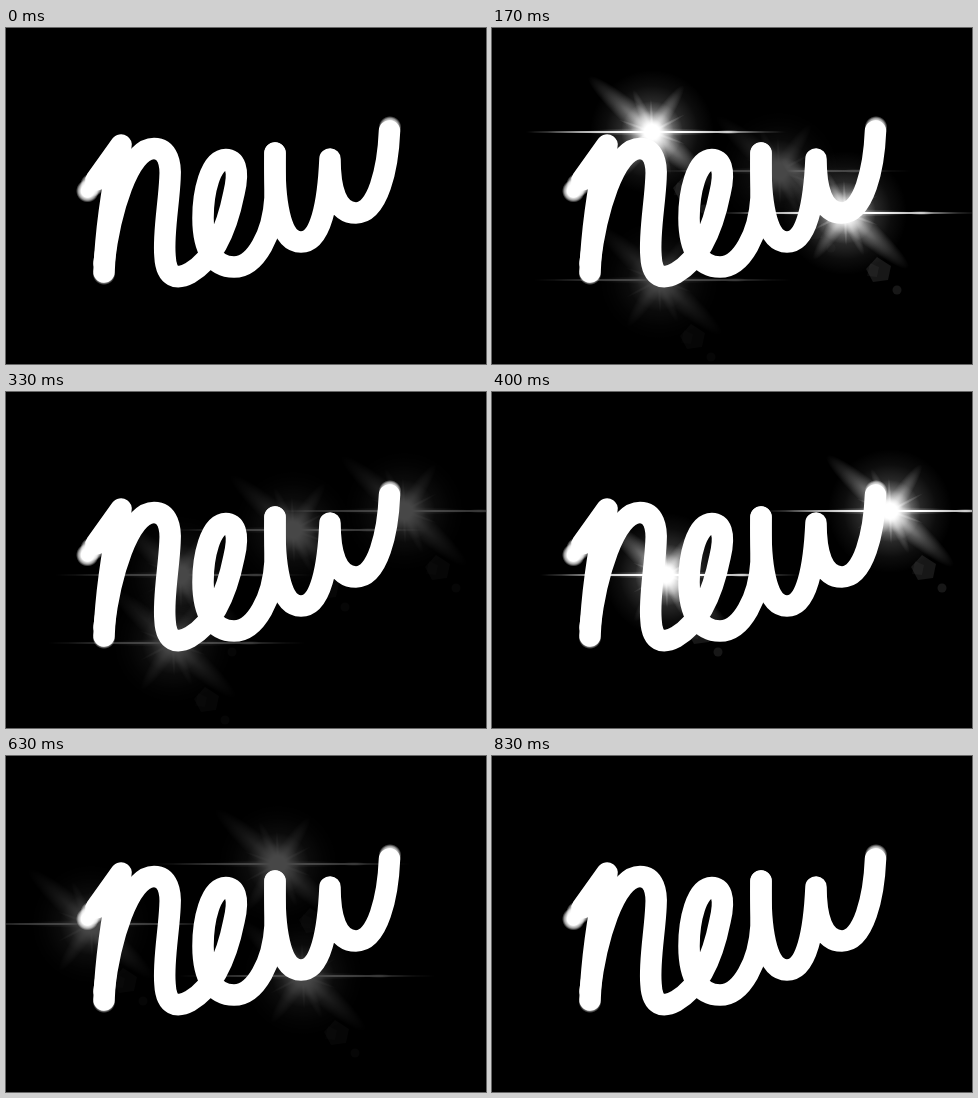
Animation, 480 px wide and 336 px high, one loop 0.91 s. Source, as an HTML page:

```html
<!DOCTYPE html>
<html lang="en">
<head>
<meta charset="utf-8">
<title>new</title>
<style>
  html, body { margin: 0; width: 100%; height: 100%; overflow: hidden; background: #000; }
  svg { display: block; width: 100vw; height: 100vh; }
  .flare {
    --from: 0px;
    --to: 0px;
    opacity: 0;
    animation: 910ms step-end infinite;
  }
  .a { animation-name: a; }
  .b { animation-name: b; }
  .c { animation-name: c; }
  .d { animation-name: d; }
  .e { animation-name: e; }

  /* each flare: dim, full, dim, off */
  @keyframes a {
    0% { opacity: 0; }
    10.989% { opacity: .28; transform: translateY(var(--from)); }
    18.681% { opacity: 1; transform: none; }
    25.275% { opacity: .28; transform: translateY(var(--to)); }
    36.264%, 100% { opacity: 0; }
  }
  @keyframes b {
    0% { opacity: 0; }
    18.681% { opacity: .28; transform: translateY(var(--from)); }
    25.275% { opacity: 1; transform: none; }
    36.264% { opacity: .28; transform: translateY(var(--to)); }
    43.956%, 100% { opacity: 0; }
  }
  @keyframes c {
    0% { opacity: 0; }
    36.264% { opacity: .28; }
    43.956% { opacity: 1; }
    51.648% { opacity: .28; }
    58.242%, 100% { opacity: 0; }
  }
  @keyframes d {
    0% { opacity: 0; }
    51.648% { opacity: .28; }
    58.242% { opacity: 1; }
    69.231% { opacity: .28; }
    76.923%, 100% { opacity: 0; }
  }
  @keyframes e {
    0% { opacity: 0; }
    69.231% { opacity: .28; }
    76.923% { opacity: 1; }
    84.615% { opacity: .28; }
    91.209%, 100% { opacity: 0; }
  }
</style>
</head>
<body>
<svg viewBox="0 0 480 336" preserveAspectRatio="none">
  <defs>
    <radialGradient id="core">
      <stop offset="0" stop-color="#fff"/>
      <stop offset=".24" stop-color="#fff"/>
      <stop offset=".42" stop-color="#fff" stop-opacity=".6"/>
      <stop offset=".7" stop-color="#fff" stop-opacity=".2"/>
      <stop offset="1" stop-color="#fff" stop-opacity="0"/>
    </radialGradient>
    <radialGradient id="halo">
      <stop offset="0" stop-color="#fff" stop-opacity=".5"/>
      <stop offset=".4" stop-color="#fff" stop-opacity=".2"/>
      <stop offset=".75" stop-color="#fff" stop-opacity=".05"/>
      <stop offset="1" stop-color="#fff" stop-opacity="0"/>
    </radialGradient>
    <radialGradient id="ray">
      <stop offset="0" stop-color="#fff" stop-opacity=".6"/>
      <stop offset=".5" stop-color="#fff" stop-opacity=".24"/>
      <stop offset="1" stop-color="#fff" stop-opacity="0"/>
    </radialGradient>
    <radialGradient id="dab">
      <stop offset=".55" stop-color="#fff"/>
      <stop offset=".8" stop-color="#fff" stop-opacity=".6"/>
      <stop offset="1" stop-color="#fff" stop-opacity="0"/>
    </radialGradient>
    <linearGradient id="streak">
      <stop offset="0" stop-color="#fff" stop-opacity="0"/>
      <stop offset=".12" stop-color="#fff" stop-opacity=".5"/>
      <stop offset=".4" stop-color="#fff"/>
      <stop offset=".6" stop-color="#fff"/>
      <stop offset=".85" stop-color="#fff" stop-opacity=".5"/>
      <stop offset="1" stop-color="#fff" stop-opacity="0"/>
    </linearGradient>

    <g id="flare" fill="url(#ray)">
      <circle r="62" fill="url(#halo)"/>
      <ellipse rx="84" ry="13" transform="rotate(41)"/>
      <ellipse rx="56" ry="9" transform="rotate(-56)"/>
      <ellipse rx="46" ry="6" transform="rotate(66)"/>
      <ellipse rx="38" ry="2" transform="rotate(-28)"/>
      <ellipse rx="36" ry="2" transform="rotate(20)"/>
      <ellipse rx="34" ry="2" transform="rotate(88)"/>
      <ellipse rx="70" ry="4"/>
      <ellipse cx="4" rx="131" ry="1.1" fill="url(#streak)"/>
      <ellipse cx="76" rx="13" ry="2.4"/>
      <circle r="31" fill="url(#core)"/>
      <g fill="#fff" fill-opacity=".09">
        <path d="M32 44 46 53 43 67 28 69 21 56Z"/>
        <path d="M25 50 34 54 32 64 22 63Z" fill-opacity=".04"/>
        <circle cx="52" cy="77" r="4.5"/>
      </g>
    </g>
  </defs>

  <rect width="480" height="336"/>

  <use class="flare a" href="#flare" x="160" y="104" style="--to: 2px"/>
  <use class="flare a" href="#flare" x="353" y="185"/>
  <use class="flare b" href="#flare" x="167" y="251" style="--from: 1px"/>
  <use class="flare b" href="#flare" x="287" y="138" style="--from: 5px"/>
  <use class="flare c" href="#flare" x="174" y="183"/>
  <use class="flare c" href="#flare" x="398" y="119"/>
  <use class="flare d" href="#flare" x="85" y="168"/>
  <use class="flare d" href="#flare" x="297" y="220"/>
  <use class="flare e" href="#flare" x="272" y="108"/>

  <g fill="none" stroke="#fff" stroke-width="21.5" stroke-linecap="round" stroke-linejoin="round">
    <path d="M90 152 115 117C108 150 100 195 98 244"/>
    <path d="M98 235C104 185 122 120.5 148 120.5C162 120.5 165 136 164 150
      C163 175 157 205 159 228C160 250 171 252 184 245C210 230 222 195 228 165
      C234 140 228 131.5 220 131.5C204 132 197 165 197 190C197 222 208 239 228 239
      C250 239 267 205 269 170L269 125"/>
    <path d="M269 125C268 170 273 214 295 214C315 214 322 175 324 131
      C324 160 330 185 350 185C372 185 382 140 383.5 103"/>
  </g>
  <g fill="url(#dab)">
    <circle cx="86" cy="157" r="12"/>
    <circle cx="81.500" cy="163" r="11.500"/>
    <circle cx="98" cy="245.500" r="11.500"/>
    <circle cx="384" cy="99.500" r="11.500"/>
  </g>
</svg>
</body>
</html>
```
